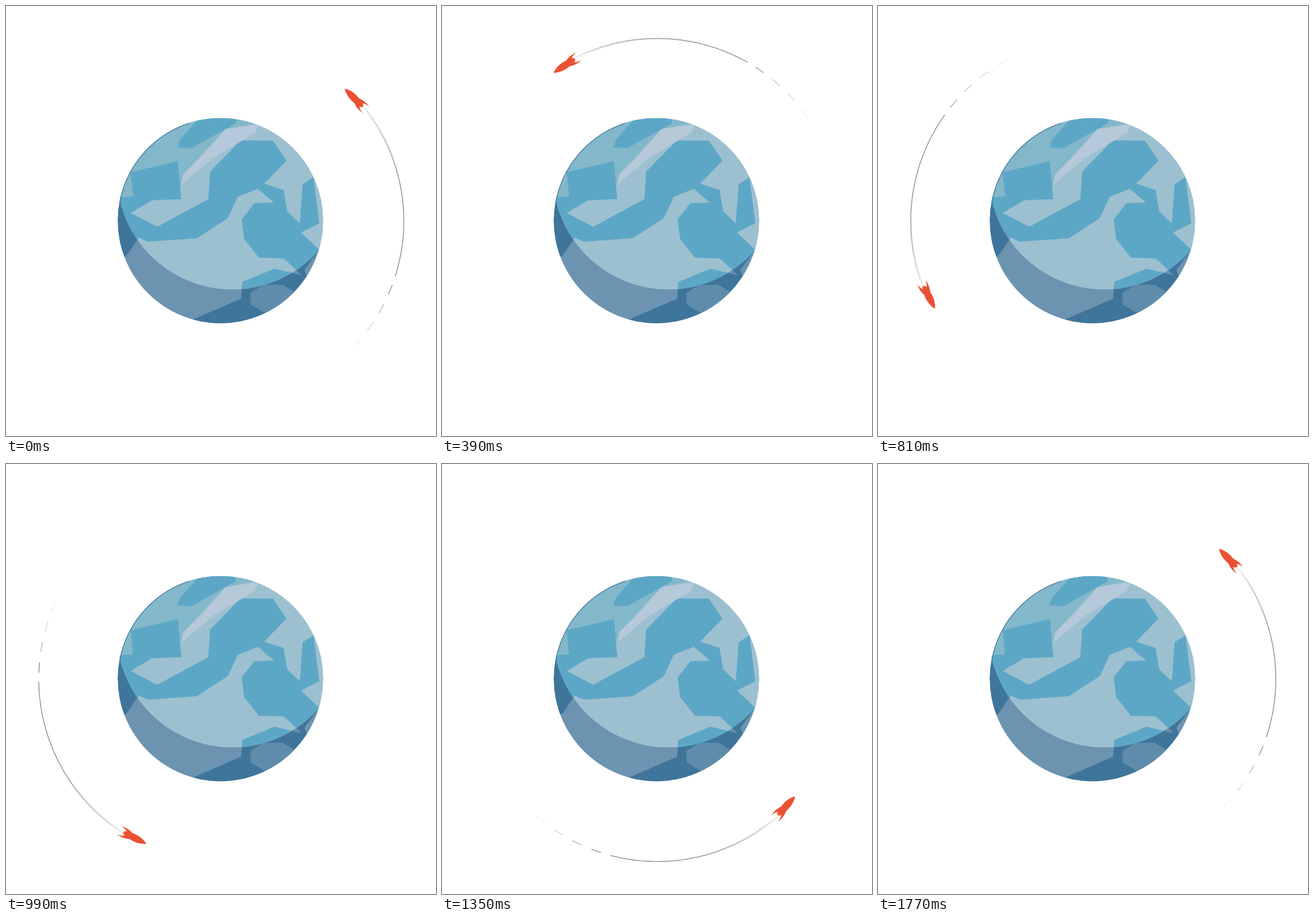
An HTML page with a canvas for the animation above (1800 ms loop, 748 px wide and 748 px high).

```html
<!DOCTYPE html>
<html>
<head>
<meta charset="utf-8">
<style>
html, body { margin: 0; width: 100%; height: 100%; overflow: hidden; background: #fff; }
canvas { display: block; }
</style>
</head>
<body>
<canvas id="stage" width="748" height="748"></canvas>
<script>
const ctx = document.getElementById('stage').getContext('2d');
const RAD = Math.PI / 180;
const LOOP = 1800, STEP = 30;
const ORBIT = { x: 374.5, y: 374, r: 317.5 };
const PLANET = { x: 373, y: 373.4, r: 178.5 };
const DAY = { x: 393.5, y: 292.3, r: 200.7 };

// Key points of the coastlines as x, y pairs; the planet's disc trims them
const SEA = [408,234, 464,234, 488,269, 449,309, 483,320, 489,357, 511,378, 516,310,
  535,298, 545,378, 513,394, 545,424, 519,459, 560,560, 310,552, 409,509, 411,480,
  467,457, 514,468, 483,439, 440,438, 414,405, 410,371, 432,343, 466,342, 438,318,
  403,332, 386,369, 332,404, 247,410, 231,403, 209,435, 180,440, 180,334, 221,331,
  217,289, 299,270, 305,336, 254,338, 217,360, 263,384, 352,336, 355,288];
const HAZE = [180,335, 221,331, 303,312, 308,293, 382,214, 428,205, 428,180, 180,180];
const BAY = [336,195, 303,232, 298,246, 323,247, 400,204, 400,185];
const STREAK = [382,214, 439,206, 433,221, 362,263, 306,310, 308,293, 340,262];

function poly(pts, color) {
  ctx.beginPath();
  for (let i = 0; i < pts.length; i += 2) ctx.lineTo(pts[i], pts[i + 1]);
  ctx.fillStyle = color;
  ctx.fill();
}

function octagon(x, y, rx, ry) {
  return Array.from({ length: 8 }, (_, i) => (i + 0.5) * Math.PI / 4)
    .flatMap(t => [x + rx * Math.cos(t), y + ry * Math.sin(t)]);
}

function clipDisc(c) {
  ctx.beginPath();
  ctx.arc(c.x, c.y, c.r, 0, 7);
  ctx.clip();
}

function flood(color) {
  ctx.fillStyle = color;
  ctx.fillRect(150, 150, 450, 450);
}

function drawPlanet() {
  ctx.save();
  clipDisc(PLANET);
  flood('#6c94b0');
  poly(SEA, '#3f759b');
  poly(octagon(465, 509, 43, 26), '#5f8cab');

  ctx.save();
  clipDisc(DAY);
  flood('#9cc0d0');
  poly(HAZE, '#83b7ca');
  poly(SEA, '#5da7c6');
  poly(BAY, '#5da7c6');
  poly(STREAK, '#b5c9d8');
  ctx.restore();

  // Dark rim at the upper left
  ctx.beginPath();
  ctx.arc(PLANET.x, PLANET.y, PLANET.r, 190 * RAD, 252 * RAD);
  ctx.lineWidth = 2.4;
  ctx.strokeStyle = '#3f759b';
  ctx.stroke();
  ctx.restore();
}

// Orbit angle of the nose, counterclockwise from the right
function noseAngle(n) {
  return n <= 30 ? 47 + 6 * n : 227 + (n - 30) * 179 / 29;
}

function arc(from, to, width, gray, alpha) {
  ctx.beginPath();
  ctx.arc(ORBIT.x, ORBIT.y, ORBIT.r, -from * RAD, -to * RAD);
  ctx.lineWidth = width;
  ctx.strokeStyle = `rgba(${gray},${gray},${gray},${alpha})`;
  ctx.stroke();
}

function drawTrail(a) {
  const start = 7.8, span = 56.7, parts = 60;
  for (let i = 0; i < parts; i++) {
    const near = 1 - i / parts;
    const back = a - start - span * i / parts;
    const gray = Math.round(100 + 140 * Math.pow(near, 1.4));
    arc(back, back - span / parts - 0.05, 1 + 2.5 * near * near, gray, 1);
  }
  for (let i = 0; i < 4; i++) {
    const back = a - 67.5 - 6.6 * i;
    arc(back, back - 3.2, 1, 95, Math.pow(1 - i / 4, 1.3));
  }
}

function drawRocket(a) {
  const r = 314.8;
  ctx.save();
  ctx.translate(ORBIT.x + r * Math.cos(a * RAD), ORBIT.y - r * Math.sin(a * RAD));
  ctx.rotate((92 - a) * RAD);
  ctx.fillStyle = '#ea5133';
  ctx.beginPath();
  for (const s of [-1, 1]) {
    ctx.moveTo(0, 0);
    ctx.bezierCurveTo(8, 5 * s, 18, 7.4 * s, 30, 5.8 * s);
    ctx.quadraticCurveTo(38, 10 * s, 53, 8.2 * s);
    ctx.quadraticCurveTo(43, 7 * s, 40, 3.6 * s);
    ctx.lineTo(43, 3 * s);
    ctx.quadraticCurveTo(44.5, 1.5 * s, 44, 0);
    ctx.closePath();
  }
  ctx.fill();
  ctx.fillRect(3, -0.6, 40.5, 1.2);
  ctx.restore();
}

function draw(now) {
  const n = Math.floor(((now + 0.5) % LOOP) / STEP);
  const a = noseAngle(n);
  ctx.fillStyle = '#fff';
  ctx.fillRect(0, 0, 748, 748);
  drawPlanet();
  drawTrail(a);
  drawRocket(a);
}

let begin = null;
function tick(now) {
  if (begin === null) begin = now;
  draw(now - begin);
  requestAnimationFrame(tick);
}
draw(0);
requestAnimationFrame(tick);
</script>
</body>
</html>
```
